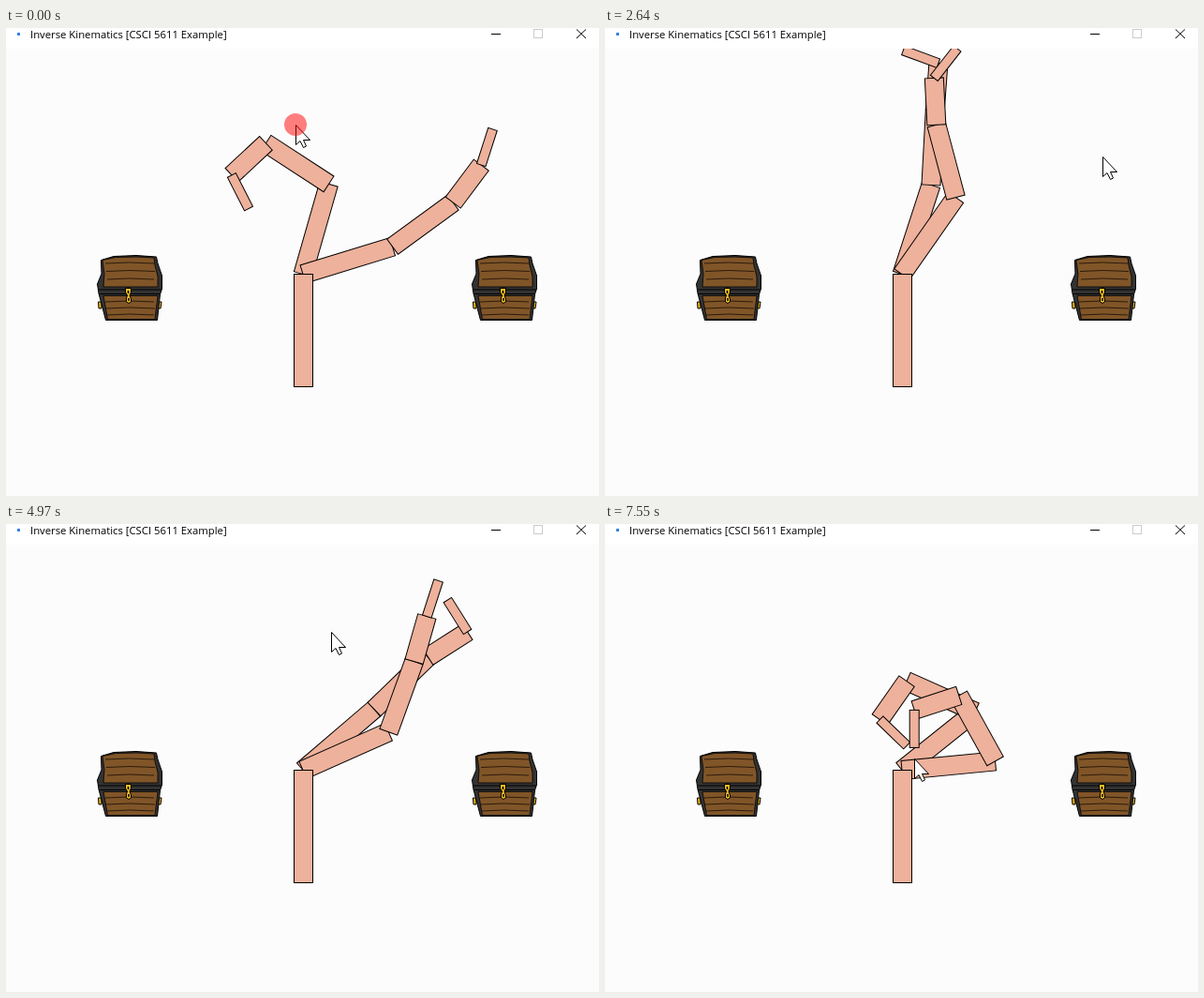
An HTML page for the animation above (7.58 s loop, 633 px wide and 499 px high).

```html
<!DOCTYPE html>
<html lang="en">
<head>
<meta charset="utf-8">
<title>Inverse Kinematics</title>
<style>
  html, body { margin: 0; width: 100%; height: 100%; overflow: hidden; background: #fcfcfc; }
  svg { display: block; width: 633px; height: 499px; }
  text { font: 11.3px "Open Sans", "Noto Sans", sans-serif; }
  .limb { fill: #eeb19b; stroke: #000; }
</style>
</head>
<body>
<svg viewBox="0 0 633 499">
  <defs>
    <g id="chest" stroke="#000" stroke-linejoin="round">
      <path d="M1.500 50H5V57H2Z M69 50H65V57H68Z" fill="#e8b31c"/>
      <path d="M4.500 5.500L18 1.500L42 .5L63.500 2L65 9L69.500 22V36L67.500 42L64.500 69.500H9.500L2 41L.5 31L5 20Z" fill="#333"/>
      <path d="M6 5.500L20 2.500L42 2L61 3L62 11L65 23V34H7L8 20Z M7 43.500H65L62 68.500H11.500Z" fill="#805528" stroke-width=".8"/>
      <g id="grain" fill="none" stroke="#2b1b0c"></g>
      <path d="M1 37H69M2 41.500H68" fill="none"/>
      <path d="M30.500 35.500H36.500V40L35 43L36.500 47V50L34 51.500L31.500 50V46L32.500 43L30.500 40Z" fill="#f2bd1d"/>
      <path d="M33.500 38V41M34 46V49" stroke-width="1.500"/>
    </g>
  </defs>
  <rect width="633" height="499" fill="#fcfcfc"/>
  <use href="#chest" x="97" y="242"/>
  <use href="#chest" x="497" y="242"/>
  <g id="arms" transform="translate(317 262.500)"></g>
  <rect class="limb" x="307.500" y="262.500" width="20" height="120"/>

  <rect width="633" height="22" fill="#fff"/>
  <rect x="12" y="5" width="3" height="3" fill="#2f86e0"/>
  <text x="26" y="11">Inverse Kinematics [CSCI 5611 Example]</text>
  <g fill="none" stroke="#000">
    <path d="M518 6.500H528"/>
    <rect x="563.500" y="1.500" width="9" height="9" stroke="#ccc"/>
    <path d="M609 1.500L619 11M619 1.500L609 11"/>
  </g>

  <g id="cursor">
    <path d="M.5 .5V21.500L5 17.500L8.500 24.500L11.500 23L8.500 16.500H15.500Z" fill="#fff" stroke="#000"/>
    <circle id="press" r="12" fill="#f00" opacity=".5"/>
  </g>
</svg>
<script>
const LOOP = 7580;
const PRESS_TIME = 100;
const LENGTHS = [100, 80, 50, 40];
const WIDTHS = [20, 20, 20, 10];

// Key poses: time in ms and the heading of each segment in degrees.
const poses = [
  { time: 0, back: [-74, -147, -223, -297], front: [-17, -36, -53, -72] },
  { time: 800, back: [-82, -150, -212, -275], front: [-48, -105, -160, -210] },
  { time: 1840, back: [-106, -159, -191, -235], front: [-90, -176, -197, -194] },
  { time: 2640, back: [-72, -87, -86, -160], front: [-55, -105, -93, -52] },
  { time: 3870, back: [-9.5, 26.5, 78, 18], front: [6.5, 0, 36, 75.5] },
  { time: 4970, back: [-40.5, -44, -32.5, -122], front: [-24, -70, -74, -72] },
  { time: 5890, back: [-71, -110, -136, -265], front: [-45, -126, -167, -204] },
  { time: 7550, back: [-38.6, -156, -235, -316], front: [-5.5, -119, -198, -270] }
];

// The pointer runs ahead of the arms, then waits for them.
const stops = [
  { time: 0, tip: [309, 103] },
  { time: 1550, tip: [104, 155] },
  { time: 1840, tip: [150, 159] },
  { time: 2370, tip: [531, 137] },
  { time: 2640, tip: [531, 137] },
  { time: 3450, tip: [592, 372] },
  { time: 3870, tip: [570, 360] },
  { time: 4710, tip: [355, 115] },
  { time: 4970, tip: [347, 115] },
  { time: 5890, tip: [343, 205] },
  { time: 7550, tip: [330, 250] }
];

function addShape(parent, tag, attrs = {}) {
  const el = document.createElementNS("http://www.w3.org/2000/svg", tag);
  for (const name in attrs) el.setAttribute(name, attrs[name]);
  return parent.appendChild(el);
}

// Smooth curve through the keys that never overshoots them.
function sample(keys, part, index, time) {
  const value = k => keys[k][part][index];
  const slope = k => (value(k + 1) - value(k)) / (keys[k + 1].time - keys[k].time);
  const tangent = k => {
    if (k === 0) return slope(0);
    if (k === keys.length - 1) return slope(k - 1);
    const a = slope(k - 1), b = slope(k);
    return a * b > 0 ? 2 * a * b / (a + b) : 0;
  };
  const last = keys.length - 1;
  if (time >= keys[last].time) return value(last);
  const next = keys.findIndex(key => key.time > time);
  const k = next - 1;
  const span = keys[next].time - keys[k].time;
  const u = (time - keys[k].time) / span;
  const ease = u * u * (3 - 2 * u);
  return value(k) + (value(next) - value(k)) * ease
    + span * u * (1 - u) * (tangent(k) * (1 - u) - tangent(next) * u);
}

function buildArm(name) {
  const arms = document.getElementById("arms");
  const limbs = LENGTHS.map((width, i) =>
    addShape(arms, "rect", { class: "limb", y: -WIDTHS[i] / 2, width, height: WIDTHS[i] }));
  return time => {
    let x = 0, y = 0;
    limbs.forEach((limb, i) => {
      const angle = sample(poses, name, i, time);
      limb.setAttribute("transform", `translate(${x} ${y}) rotate(${angle})`);
      x += LENGTHS[i] * Math.cos(angle * Math.PI / 180);
      y += LENGTHS[i] * Math.sin(angle * Math.PI / 180);
    });
  };
}

function drawGrain() {
  const grain = document.getElementById("grain");
  for (const top of [9, 50])
    for (let row = 0; row < 3; row++) {
      const y = top + row * (top < 40 ? 8.5 : 7);
      addShape(grain, "path", { d: `M${9 + row} ${y}Q34 ${y - 2} ${61 + row % 2} ${y}` });
    }
}

drawGrain();
const moveBack = buildArm("back");
const moveFront = buildArm("front");
const cursor = document.getElementById("cursor");
const press = document.getElementById("press");

function draw(time) {
  moveBack(time);
  moveFront(time);
  const [x, y] = [0, 1].map(i => Math.round(sample(stops, "tip", i, time)));
  cursor.setAttribute("transform", `translate(${x} ${y})`);
  press.setAttribute("visibility", time < PRESS_TIME ? "visible" : "hidden");
}

const start = performance.now();
function tick() {
  draw((performance.now() - start) % LOOP);
  requestAnimationFrame(tick);
}
tick();
</script>
</body>
</html>
```
